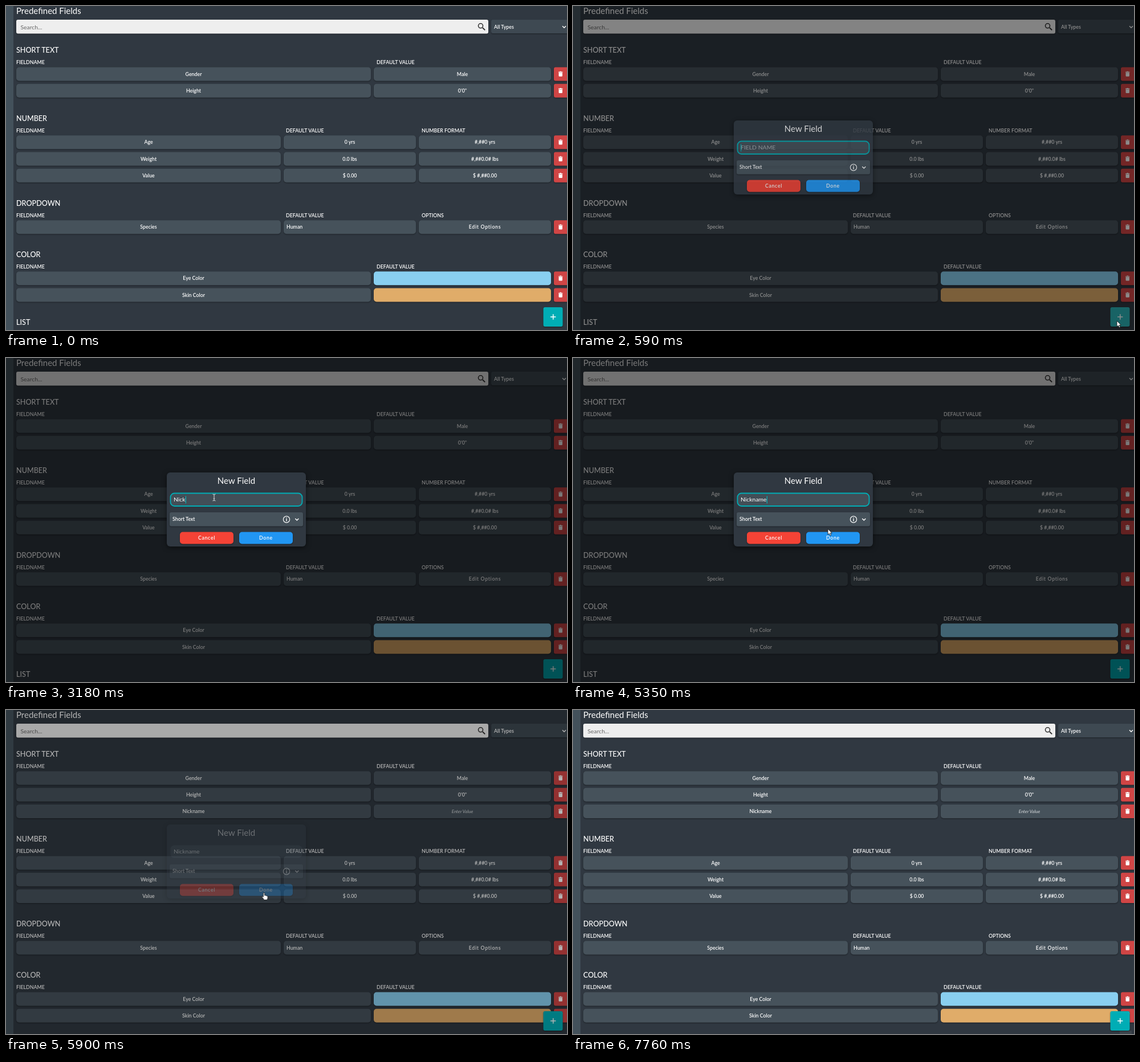
Animation, 984 px wide and 569 px high, one loop 7850 ms. Source, as an HTML page:

```html
<!DOCTYPE html>
<html lang="en">
<head>
<meta charset="utf-8">
<title>Predefined Fields</title>
<style>
  html, body { margin: 0; width: 100%; height: 100%; overflow: hidden; background: #303841; }
  svg { display: block; width: 984px; height: 569px; font: 600 8.8px Lato, "Open Sans", sans-serif; }
  text { fill: #fff; white-space: pre; }
  .mid { text-anchor: middle; }
  .title { font-size: 15px; font-weight: 400; }
  .heading { font-size: 12.6px; font-weight: 500; }
  .input { font-size: 10.4px; font-weight: 400; }
  .button { letter-spacing: .65px; }
  .empty { font-size: 8px; font-weight: 400; font-style: italic; fill: #d5d9dc; }
  .hint { fill: #666; }
  .faded { fill: #a3a9ad; }
  .box { fill: #46525b; filter: drop-shadow(0 1px 1px #0006); }
  .delete { fill: #d04545; }
  .line { fill: none; stroke: #fff; stroke-width: 1.5; }
  .pointer { fill: #fff; stroke: #111; stroke-width: .8; stroke-linejoin: round; }
</style>
</head>
<body>
<svg id="stage" viewBox="0 0 984 569"></svg>
<script>
const LOOP = 7850, ROW = 29.25;
const TWO = [[18, 622], [645, 311]];
const THREE = [[18, 464], [487, 232], [724, 232]];

// Text is placed by the middle of its capitals.
const text = (x, y, str, cls = '', size = 8.8) =>
  `<text x="${x}" y="${y + size * .36}" class="${cls}">${str}</text>`;
const box = (x, y, w, h, r, attrs = '') =>
  `<rect x="${x}" y="${y}" width="${w}" height="${h}" rx="${r}" class="box" ${attrs}/>`;
const fill = color => `style="fill:${color}"`;
const chevron = (x, y) => `<path class="line" d="M${x - 3} ${y - 1.6}l3 3l3 -3"/>`;

const trash = y => box(961, y - 12, 30, 24, 3, fill('#d04545')) +
  `<path fill="#fff" d="M969 ${y - 3.9}h2l.7 -.8h2l.7 .8h2v1.1h-7.4zM969.5 ${y - 2.2}h6.4v5.2q0 1.2 -1.2 1.2h-4q-1.2 0 -1.2 -1.2z"/>`;

function cell([x, w], y, value) {
  const isColor = /^#[0-9a-f]{6}$/.test(value);
  const frame = box(x, y - 12, w, 24, 5, isColor ? fill(value) : '');
  if (isColor) return frame;
  if (value === 'Human') return frame + text(x + 5, y, value);
  const cls = { 'Edit Options': 'button', 'Enter Value': 'empty' }[value] || '';
  return frame + text(x + w / 2, y, value, 'mid ' + cls);
}

const row = (cols, y, values) =>
  values.map((value, i) => cell(cols[i], y, value)).join('') + trash(y);

function section(y, name, cols, labels, rows) {
  return text(18, y, name, 'heading', 12.6) +
    labels.map((label, i) => text(cols[i][0] + (i ? 5 - (cols === THREE && i === 1) : 0), y + 21.6, label)).join('') +
    rows.map((values, i) => row(cols, y + 42.3 + i * ROW, values)).join('');
}

const page = `
  <rect width="984" height="569" fill="#303841"/>
  <rect width="13" height="569" fill="#43515b"/>
  ${text(18, 8.6, 'Predefined Fields', 'title', 15)}
  ${box(18, 24, 828, 24.5, 3, fill('#eee'))}
  ${text(25.5, 37, 'Search...', 'input hint', 10.4)}
  <path d="M836 38.2l4.2 4.2" stroke="#333" stroke-width="2"/>
  <circle cx="832.5" cy="34.8" r="4" fill="none" stroke="#333" stroke-width="1.6"/>
  ${box(851, 24, 140, 24, 3, fill('#3e4952'))}
  ${text(856, 36.3, 'All Types', '', 9)}
  ${chevron(979, 36.8)}
  ${section(77.2, 'SHORT TEXT', TWO, ['FIELDNAME', 'DEFAULT VALUE'],
    [['Gender', 'Male'], ['Height', `0'0"`]])}
  <g id="added">${row(TWO, 178, ['Nickname', 'Enter Value'])}</g>
  <g id="below">
    ${section(197, 'NUMBER', THREE, ['FIELDNAME', 'DEFAULT VALUE', 'NUMBER FORMAT'],
      [['Age', '0 yrs', '#,##0 yrs'], ['Weight', '0.0 lbs', '#,##0.0# lbs'], ['Value', '$ 0.00', '$ #,##0.00']])}
    ${section(346, 'DROPDOWN', THREE, ['FIELDNAME', 'DEFAULT VALUE', 'OPTIONS'],
      [['Species', 'Human', 'Edit Options']])}
    ${section(436, 'COLOR', TWO, ['FIELDNAME', 'DEFAULT VALUE'],
      [['Eye Color', '#89cff0'], ['Skin Color', '#e0ac69']])}
    ${section(555.6, 'LIST', TWO, [], [])}
  </g>
  <rect id="peek" x="959" y="563" width="21" height="6" fill="#fff" fill-opacity=".06"/>
  ${box(942.5, 529, 34, 34, 3, 'id="add" ' + fill('#00adb5'))}
  <path class="line" d="M955 546h9.4M959.7 541.3v9.4"/>`;

const dialog = `
  <g id="dialog">
    ${box(282, 201, 244, 130, 6, 'style="fill:#303841;filter:drop-shadow(0 2px 4px #0008)"')}
    ${text(404, 216, 'New Field', 'title mid', 15)}
    <rect id="field" x="288.5" y="237.5" width="231" height="22.5" rx="7" fill="#424e57" stroke="#00adb5" stroke-width="1.8"/>
    ${text(294, 248.7, '', 'input', 10.4).replace('<text', '<text id="typed"')}
    <rect id="caret" x="294" y="242.5" width="1" height="13" fill="#00c4cc"/>
    ${box(287, 271, 234, 24.5, 3)}
    ${text(292, 283.2, 'Short Text', '', 9)}
    <circle class="line" cx="492" cy="283.5" r="5.6" style="stroke-width:1.2"/>
    <path class="line" d="M492 282.6v3.8M492 280.2v1.4"/>
    ${chevron(510.3, 283.6)}
    ${box(305, 305.5, 94, 21, 5, fill('#f44336'))}
    ${text(352, 316, 'Cancel', 'mid button')}
    ${box(409, 305.5, 94, 21, 5, 'id="done" ' + fill('#2196f3'))}
    ${text(456, 316, 'Done', 'mid button')}
  </g>`;

const cursor = `
  <g id="cursor">
    <path id="arrow" class="pointer" d="M0 0v10.2l2.4 -2.2l1.7 3.7l1.7 -.8l-1.7 -3.6h3.2z"/>
    <path id="beam" d="M-2.5 -5.8q2.5 0 2.5 1.2q0 -1.2 2.5 -1.2M0 -5v10M-2.5 5.8q2.5 0 2.5 -1.2q0 1.2 2.5 1.2M-1.3 2h2.6" fill="none" stroke="#d8dcde"/>
    <path id="hand" class="pointer" d="M-1.1 .9q0 -1.2 1.1 -1.2t1.1 1.2v3.7q1.8 -.7 2.2 .5q1.6 -.4 1.9 .7q1.6 -.1 1.6 1.3q0 3 -1.4 5.4h-5.2q-1.2 -2.2 -3.6 -4.9q0 -1.5 1.4 -1.1l.9 .9z"/>
  </g>`;

const $ = id => document.getElementById(id);
$('stage').innerHTML = page + '<rect id="shade" width="984" height="569" opacity="0"/>' + dialog + cursor;

const start = document.timeline.currentTime || 0;

// keys: [ms, value] pairs; the first value also holds from the loop start.
function track(id, prop, keys, easing = 'step-end') {
  const first = keys[0], last = keys[keys.length - 1];
  const frames = [[0, first[1]], ...keys, [LOOP, last[1]]]
    .map(([ms, value]) => ({ offset: ms / LOOP, [prop]: value, easing }));
  $(id).animate(frames, { duration: LOOP, iterations: Infinity }).startTime = start;
}
const move = (x, y) => `translate(${x}px, ${y}px)`;

track('shade', 'opacity', [[0, 0], [440, .08], [515, .28], [590, .45], [670, .52],
  [5730, .5], [5810, .42], [5900, .29], [5980, .01], [6060, 0]]);
track('dialog', 'opacity', [[0, 0], [440, .1], [515, .45], [590, .8], [670, 1],
  [5730, .95], [5810, .7], [5900, .33], [5980, 0]]);
track('added', 'opacity', [[0, 0], [5810, 1]]);
track('below', 'transform', [[0, move(0, 0)], [5810, move(0, ROW)]]);
track('field', 'stroke', [[0, '#00adb5'], [5810, 'transparent']]);
track('add', 'fill', [[0, '#00adb5'], [130, '#2bb3b8'], [670, '#00adb5']]);
track('done', 'fill', [[0, '#2196f3'], [5430, '#1e8ae0']]);
track('peek', 'opacity', [[0, 0], [7760, 1]]);

track('arrow', 'opacity', [[0, 0], [515, 1], [1150, 0], [5110, 1], [5400, 0], [6050, 1], [6910, 0]]);
track('beam', 'opacity', [[0, 0], [1150, 1], [5110, 0]]);
track('hand', 'opacity', [[0, 0], [70, 1], [515, 0], [5400, 1], [6050, 0]]);
track('cursor', 'transform', [
  [70, move(957, 562)], [130, move(954, 553)], [660, move(954, 553)], [800, move(850, 490)],
  [1000, move(520, 325)], [1140, move(395, 262)], [1220, move(373, 255)], [1380, move(371, 249)],
  [1530, move(370, 243)], [1700, move(364, 244)], [1790, move(365, 245)], [5020, move(365, 245)],
  [5120, move(385, 256)], [5240, move(430, 283)], [5350, move(447, 300)], [5440, move(451, 312)],
  [5580, move(452.5, 321)], [6030, move(452.5, 321)], [6140, move(510, 347)],
  [6440, move(707, 437)], [6700, move(830, 505)], [6910, move(906, 566)]], 'linear');

const keyTimes = [2550, 2780, 3010, 3180, 3790, 3960, 4110, 4260];
const caretOn = [[440, 1000], [1530, 2100], [2550, 3640], [3790, 4740], [5220, 5810]];

function type(now) {
  const t = Math.max(0, now - start) % LOOP;
  const count = keyTimes.filter(ms => ms <= t).length;
  const typed = $('typed');
  typed.textContent = count ? 'Nickname'.slice(0, count) : 'FIELD NAME';
  typed.classList.toggle('faded', !count);
  $('caret').setAttribute('x', 294.2 + (count ? typed.getComputedTextLength() : 0));
  $('caret').style.opacity = +caretOn.some(([from, to]) => t >= from && t < to);
  requestAnimationFrame(type);
}
type(start);
</script>
</body>
</html>
```
